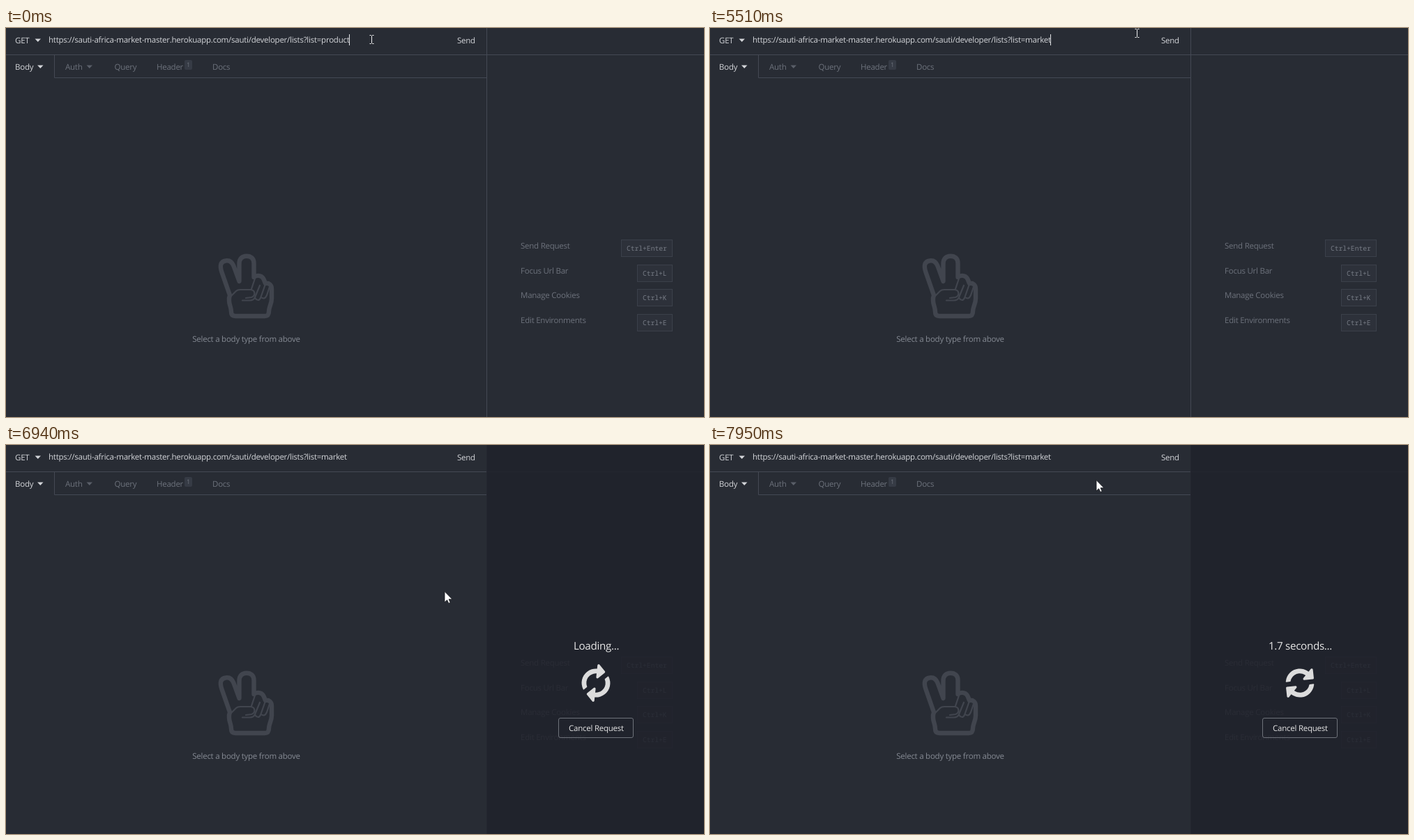
Write an HTML page that moves like this. It is 1001 px wide and 559 px high and loops after 7990 ms.

```html
<!DOCTYPE html>
<html lang="en">
<head>
<meta charset="utf-8">
<title>Request client</title>
<style>
  html, body { margin: 0; width: 100%; height: 100%; overflow: hidden; background: #282c34; }
  svg { display: block; width: 1001px; height: 559px; }
  text {
    font: 11.5px "Open Sans", "Noto Sans", sans-serif;
    letter-spacing: -.021em;
    text-rendering: geometricPrecision;
    fill: #d3d5d9;
  }
  .dim { fill: #6d727c; }
  .note { fill: #858a93; }
  .big { font-size: 15.2px; fill: #e6e6e6; }
  .bright { fill: #e6e6e6; }
  .key { font: 9.65px "Noto Sans Mono", "DejaVu Sans Mono", monospace; letter-spacing: 0; fill: #777c86; }
  .mid { text-anchor: middle; }
  .line { fill: none; stroke: #444954; }
  .hand { fill: none; stroke: #41454e; stroke-linecap: round; stroke-linejoin: round; }
</style>
</head>
<body>
<svg viewBox="0 0 1001 559">
  <rect width="1001" height="559" fill="#282c34"/>
  <rect id="hover" x="631" width="58" height="38" fill="#252930"/>
  <path class="line" d="M0 38.5H1001M689.5 0V559M69.5 38V71.5H689"/>

  <text x="13" y="22">GET</text>
  <path d="M41.5 15.5h8.5l-4.25 4.5z" fill="#d3d5d9"/>
  <text id="url" x="61" y="21"></text>
  <rect id="caret" y="9" width="1" height="16" fill="#e4e5e8"/>
  <text x="647" y="22">Send</text>

  <text x="13" y="60">Body</text>
  <path d="M45 53.5h8.5l-4.25 4.5z" fill="#d3d5d9"/>
  <g id="tabs"></g>
  <path d="M115.5 53.5h8.5l-4.25 4.5z" fill="#5a5f69"/>
  <rect x="256" y="46" width="11" height="14" rx="2" fill="#363b45"/>
  <text class="dim mid" x="261.5" y="56" style="font-size:9px">1</text>

  <g class="hand">
    <path stroke-width="6.4" d="M321 384L309.500 351C306 341 308 335.500 315 334.500C321 333.500 324.500 337 326.500 342L334.500 364V339C334.500 331 339 327.700 345 327.700C351 327.700 355.500 331 355.500 338V358C361 354 368 356 370 362L372 367C377 366 381 369 381 375V389C381 396 377 401 377 407C377 412 375 414 371 414H329C325 414 323 412 323 408C323 401 320 398 320 392Q319.500 388 321 384"/>
    <path stroke-width="2.2" d="M322 386L330 378Q332 376 336 376H351C358 377 358 385 352 387L344 388M339 391.500H350Q355 391.500 357 387L364 370M357 360L352 375M357 388Q362 394 365 388L372 368M366 387Q371 391 374 384L378 372"/>
  </g>
  <text class="note mid" x="344.5" y="451">Select a body type from above</text>

  <g id="keys"></g>

  <g id="overlay">
    <rect x="689" width="312" height="559" fill="#20222b" opacity=".87"/>
    <text id="status" class="big mid" x="846.5" y="294"></text>
    <g id="spin" fill="#dcdcdc">
      <path id="arrow" transform="scale(.0268) translate(-896 -896)" d="M1639 1056q0 5-1 7-64 268-268 434.500t-478 166.500q-146 0-282.500-55t-243.500-157l-129 129q-19 19-45 19t-45-19-19-45v-448q0-26 19-45t45-19h448q26 0 45 19t19 45-19 45l-137 137q71 66 161 102t187 36q134 0 250-65t186-179q11-17 53-117 8-23 30-23h192q13 0 22.500 9.500t9.500 22.500z"/>
      <use href="#arrow" transform="rotate(180)"/>
    </g>
    <rect x="792.5" y="392.5" width="107" height="28" rx="2.5" fill="none" stroke="#6e727a"/>
    <text class="mid bright" x="846.5" y="411">Cancel Request</text>
  </g>

  <path id="beam" d="M-3 -6H-1L0 -5L1 -6H3M0 -5V5M-3 6H-1L0 5L1 6H3" fill="none" stroke="#f0f0f0"/>
  <path id="pointer" d="M0 0V15.500L3.600 12.200L5.800 17L8.200 16L6.100 11.200H11Z" fill="#fff" stroke="#16181d" stroke-width=".8"/>
</svg>
<script>
const LOOP = 7990;
const BASE = "https://sauti-africa-market-master.herokuapp.com/sauti/developer/lists?list=";
const DELETES = [1630, 1800, 1960, 2140, 2320, 2460, 2690];
const INSERTS = [3400, 3550, 3680, 3890, 4040, 4160];
const CARET_OFF = [[370, 890], [1420, 1630], [3220, 3400], [4660, 5220], [5690, 6160], [6690, 7220], [7750, LOOP]];
const CLICK = 6160, LOADING = 6180, TIMER_START = 6240, SPIN = 1710;

// Mouse moves: start, end, x, y reached at the end
const MOVES = [
  [370, 550, 548, 22],
  [5220, 5460, 606, 7],
  [5460, 5690, 651, 6],
  [5850, 5950, 665, 10.5],
  [6420, 6920, 629, 210.5],
  [6990, 7440, 554, 50.5]
];

const $ = id => document.getElementById(id);
const [url, caret, hover, overlay, timer, spin, beam, pointer] =
  ["url", "caret", "hover", "overlay", "status", "spin", "beam", "pointer"].map($);

const label = (x, y, s, cls) => `<text class="${cls}" x="${x}" y="${y}">${s}</text>`;

$("tabs").innerHTML = [[85, "Auth"], [155.5, "Query"], [216, "Header"], [296, "Docs"]]
  .map(([x, s]) => label(x, 60, s, "dim")).join("");

$("keys").innerHTML = [["Send Request", "Enter"], ["Focus Url Bar", "L"], ["Manage Cookies", "K"], ["Edit Environments", "E"]]
  .map(([name, key], i) => {
    const y = 304.5 + Math.round(i * 35.6), x = key.length > 1 ? 883 : 906;
    return label(738, y + 12.5, name, "dim") +
      `<rect x="${x - .5}" y="${y}" width="${956 - x}" height="24" fill="#2d313a" stroke="#3b404a"/>` +
      label(x + 7, y + 15.5, "Ctrl+" + key, "key");
  }).join("");

const count = (times, t) => times.filter(at => t >= at).length;
const show = (el, on) => el.setAttribute("visibility", on ? "visible" : "hidden");
const setText = (el, s) => { if (el.textContent !== s) el.textContent = s; };

function mouseAt(t) {
  let x = 524, y = 16;
  for (const [start, end, toX, toY] of MOVES) {
    if (t < start) break;
    const p = Math.min(1, (t - start) / (end - start));
    const e = p * p * (3 - 2 * p);
    x += (toX - x) * e;
    y += (toY - y) * e;
  }
  return [x, y];
}

function draw(t) {
  const word = t < INSERTS[0]
    ? "product".slice(0, 7 - count(DELETES, t))
    : "market".slice(0, count(INSERTS, t));
  setText(url, BASE + word);

  const end = t < CLICK ? Math.floor(61 + url.getComputedTextLength()) : 61;
  caret.setAttribute("x", end);
  show(caret, !CARET_OFF.some(([a, b]) => t >= a && t < b));

  const [x, y] = mouseAt(t);
  const isArrow = x > 631 || t > CLICK;
  const cursor = isArrow ? pointer : beam;
  show(pointer, isArrow);
  show(beam, !isArrow);
  cursor.setAttribute("transform", isArrow
    ? `translate(${x} ${y})`
    : `translate(${Math.round(x)} ${Math.round(y)}) translate(.5 .5)`);
  show(hover, t >= CLICK && x > 631 && y < 38);

  show(overlay, t >= LOADING);
  const tenths = Math.floor((t - TIMER_START) / 100);
  setText(timer, tenths < 10 ? "Loading..." : (tenths / 10).toFixed(1) + " seconds...");
  const angle = 2 + (t - 6280) / SPIN * 360;
  spin.setAttribute("transform", `translate(846 342) rotate(${angle})`);
}

const begin = performance.now();
function tick() {
  draw((performance.now() - begin) % LOOP);
  requestAnimationFrame(tick);
}
tick();
</script>
</body>
</html>
```
